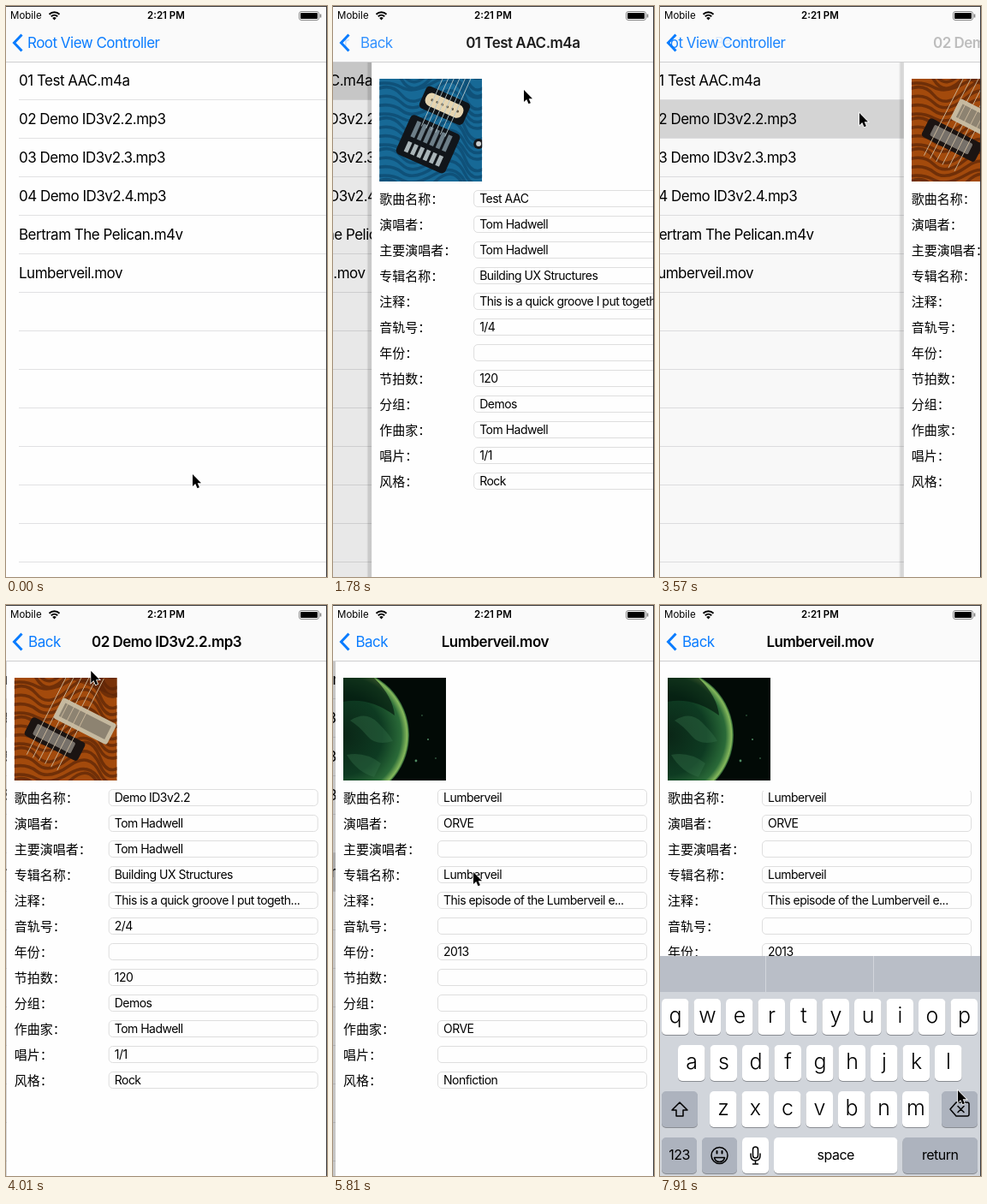
An HTML page for the animation above (8000 ms loop, 375 by 667 pixels).

```html
<!DOCTYPE html>
<html lang="zh-CN">
<head>
<meta charset="utf-8">
<title>Media metadata browser</title>
<style>
html, body { margin: 0; width: 100%; height: 100%; overflow: hidden; background: #fefefe; }
#stage { position: relative; width: 375px; height: 667px; overflow: hidden; background: #fefefe;
  font: 17px/45px Inter, "Noto Sans CJK SC", sans-serif; letter-spacing: -.03em; color: #000; white-space: nowrap; }
#stage div, #stage svg { position: absolute; }
.page { left: 0; top: 0; width: 375px; height: 667px; }
.row { left: 0; width: 375px; height: 45px; }
.row span { position: absolute; left: 15px; }
.line { left: 15px; right: 0; height: 1px; background: #e1e1e3; }
#dim { inset: 0; background: #000; }
.detail { background: #fefefe; }
.detail::before { content: ""; position: absolute; left: -6px; width: 6px; height: 667px;
  background: linear-gradient(90deg, #0000, #0002 40%, #0002); }
.label { left: 9px; font: 15px/20px "Noto Sans CJK SC", sans-serif; letter-spacing: 0; }
.field { left: 119px; width: 237px; height: 18px; padding-left: 6px; border: 1px solid #dedede;
  border-radius: 5px; font-size: 14px; line-height: 18px; }
#cover { top: 206px; width: 374px; height: 11px; background: #fefefe; }
#nav { left: 0; top: 0; width: 375px; height: 65px; background: #fafafa; border-bottom: 1px solid #cfcfd0; }
#labels { left: 13px; top: 21px; width: 362px; height: 44px; overflow: hidden; color: #0a7cff; }
#title { top: 21px; width: 374px; text-align: center; font-weight: 600; }
#network, #clock { top: 4px; font-size: 11.5px; line-height: 15px; letter-spacing: 0; }
#network { left: 5px; }
#clock { width: 374px; text-align: center; font-weight: 600; }
#keyboard { left: 0; top: 410px; }
#edge { inset: 0; border: solid #3a3a3c; border-width: 1px 1px 0 0; }
</style>
</head>
<body>
<div id="stage">
  <div class="page" id="list"></div>
  <div id="cover"></div>
  <div id="nav">
    <div id="network">Mobile</div>
    <div id="clock">2:21 PM</div>
    <div id="labels"><div id="root">Root View Controller</div><div id="back">Back</div></div>
    <div id="title"></div>
    <svg width="375" height="65" fill="none" style="left:0;top:0">
      <path id="chevron" d="M18.5 33.5L9.5 43l9 9.5" stroke="#0a7cff" stroke-width="3"/>
      <path d="M50.5 9.8a8.6 8.6 0 0 1 12 0M52.8 12.2a5.4 5.4 0 0 1 7.4 0" stroke="#000" stroke-width="2"/>
      <path d="M56.5 16.5l-2.3-2.5a3.3 3.3 0 0 1 4.6 0z" fill="#000"/>
      <rect x="342.5" y="6.5" width="23" height="10" rx="2.5" stroke="#888"/>
      <rect x="344" y="8" width="20" height="7" rx="1" fill="#000"/>
      <path d="M367.5 9.5v4" stroke="#777" stroke-width="1.5"/>
    </svg>
  </div>
  <svg id="keyboard" width="375" height="257"></svg>
  <div id="edge"></div>
  <svg id="pointer" width="14" height="20" style="left:0;top:0;overflow:visible">
    <path d="M0 0V14l3.2-3 2.3 5.2 2.4-1-2.2-5H10z" stroke="#fff" stroke-width="1.5" paint-order="stroke"/>
  </svg>
</div>
<script>
const $ = id => document.getElementById(id);
const LOOP = 8000;

// ---- list page
const files = ["01 Test AAC.m4a", "02 Demo ID3v2.2.mp3", "03 Demo ID3v2.3.mp3",
  "04 Demo ID3v2.4.mp3", "Bertram The Pelican.m4v", "Lumberveil.mov"];
let html = "";
for (let i = 0; i < 13; i++) {
  const top = 65 + i * 45;
  html += `<div class="row" style="top:${top}px"><span>${files[i] || ""}</span></div>
    <div class="line" style="top:${top + 44}px"></div>`;
}
$("list").innerHTML = html + '<div id="dim"></div>';
const rows = [...document.querySelectorAll(".row")];

// ---- cover art
function waves(color) {
  let d = "";
  for (let y = -20; y < 150; y += 9) d += `M-10 ${y}q22 ${-14 + y % 4 * 3} 36 3t38 -6t36 8t38 -4`;
  return `<path d="${d}" fill="none" stroke="${color}" stroke-width="3.5" opacity=".5"/>`;
}
function repeat(n, f) {
  return Array.from({ length: n }, (_, i) => f(i)).join("");
}
const blueGuitar = `<rect width="120" height="120" fill="#176996"/>${waves("#083a5e")}
  <g transform="translate(68 55) rotate(24)">
    <rect x="-30" y="-39" width="56" height="28" rx="5" fill="#101418"/>
    <rect x="-26" y="-33" width="47" height="16" rx="7" fill="#e6d5b0"/>
    ${repeat(6, i => `<circle cx="${-18 + i * 6.5}" cy="-25" r="1.5" fill="#665a45"/>`)}
    <rect x="-33" y="-1" width="63" height="50" rx="5" fill="#11151a"/>
    ${repeat(6, i => `<rect x="${-24 + i * 8}" y="4" width="5" height="20" fill="#6d7e88"/>
      <rect x="${-24 + i * 8}" y="30" width="5" height="13" fill="#a9b4b8"/>
      <path d="M${-17 + i * 6} -90V8" stroke="#b8c8cc" stroke-width=".8"/>`)}
  </g>
  <circle cx="116" cy="76" r="6" fill="#15181c"/><circle cx="116" cy="76" r="3" fill="#c9ced0"/>`;
const amberGuitar = `<rect width="120" height="120" fill="#a34a0c"/>${waves("#3c1504")}
  <path d="M50 -5L125 25V-5z" fill="#5c2407" opacity=".6"/>
  <g transform="translate(46 72) rotate(27)">
    <rect x="-34" y="-13" width="70" height="24" rx="4" fill="#1b1412"/>
    <rect x="-25" y="-8" width="50" height="14" rx="2" fill="#77716a"/>
    <rect x="-12" y="-49" width="70" height="27" rx="3" fill="#c5b99f"/>
    <rect x="-7" y="-44" width="60" height="17" fill="#8d8371"/>
    ${repeat(6, i => `<path d="M${-20 + i * 8} -90V30" stroke="#d0bda0" stroke-width=".8"/>`)}
  </g>`;
const planet = `<defs><radialGradient id="globe" gradientUnits="userSpaceOnUse" cx="-1" cy="67" r="78">
    <stop offset="0" stop-color="#0a2516"/><stop offset=".6" stop-color="#0e3b22"/>
    <stop offset=".88" stop-color="#2a6a38"/><stop offset=".97" stop-color="#86b95c"/>
    <stop offset="1" stop-color="#1c4f2b"/></radialGradient></defs>
  <rect width="120" height="120" fill="#020a06"/><circle cx="-1" cy="67" r="78" fill="url(#globe)"/>
  <path d="M0 0H36Q58 22 60 44Q30 22 0 28z" fill="#03150c" opacity=".65"/>
  <path d="M8 50q18 -12 32 2t18 22q-20 6 -30 -6t-20 -18M4 90q22 -4 40 10l-8 16q-20 -6 -32 -26" fill="#357049" opacity=".4"/>
  <g fill="#4f8a63"><circle cx="85" cy="97" r="1.4"/><circle cx="99" cy="72" r="1"/>
  <circle cx="108" cy="94" r=".8"/><circle cx="92" cy="44" r=".7"/></g>`;

// ---- detail pages
const names = "歌曲名称 演唱者 主要演唱者 专辑名称 注释 音轨号 年份 节拍数 分组 作曲家 唱片 风格".split(" ");
const player = "Tom Hadwell", album = "Building UX Structures";
const groove = "This is a quick groove I put togeth...";
function song(title, track) {
  return [title, player, player, album, groove, track, "", "120", "Demos", player, "1/1", "Rock"];
}
const details = {
  0: [blueGuitar, song("Test AAC", "1/4")],
  1: [amberGuitar, song("Demo ID3v2.2", "2/4")],
  5: [planet, ["Lumberveil", "ORVE", "", "Lumberveil", "This episode of the Lumberveil e...",
    "", "2013", "", "", "ORVE", "", "Nonfiction"]]
};
const pages = {};
for (const id in details) {
  const [art, values] = details[id];
  const page = pages[id] = document.createElement("div");
  page.className = "page detail";
  page.innerHTML = `<svg width="120" height="120" style="left:9px;top:85px;overflow:hidden">${art}</svg>` +
    names.map((name, i) => `<div class="label" style="top:${215 + i * 30}px">${name}：</div>
      <div class="field" style="top:${215 + i * 30}px">${values[i]}</div>`).join("");
  $("stage").insertBefore(page, $("cover"));
}

// ---- keyboard, drawn relative to its own top edge
function key(x, y, w, text = "", size = 25, fill = "#fff") {
  return `<rect x="${x}" y="${y + 1}" width="${w}" height="42" rx="5" fill="#898c92"/>
    <rect x="${x}" y="${y}" width="${w}" height="42" rx="5" fill="${fill}"/>
    <text x="${x + w / 2}" y="${y + (size > 20 ? 28 : 26)}" font-size="${size}"
      font-weight="${size > 20 ? 300 : 400}" text-anchor="middle">${text}</text>`;
}
function keyRow(letters, x, y) {
  return [...letters].map((c, i) => key(x + i * 37.5, y, 31.5, c)).join("");
}
const gray = "#adb3be";
$("keyboard").innerHTML = `<rect width="375" height="257" fill="#d1d5db"/>
  <rect width="375" height="42" fill="#b9bec7"/><path d="M123.5 0v42M249.5 0v42" stroke="#d3d6dc"/>` +
  keyRow("qwertyuiop", 2, 50) + keyRow("asdfghjkl", 21, 104) + keyRow("zxcvbnm", 58, 158) +
  key(2, 158, 42, "", 16, gray) + key(329, 158, 42, "", 16, gray) +
  key(2, 212, 41, "123", 16, gray) + key(49, 212, 41, "", 16, gray) + key(96, 212, 31) +
  key(133, 212, 144.5, "space", 16) + key(283.5, 212, 87.5, "return", 16, gray) +
  `<g fill="none" stroke="#000" stroke-width="1.5" stroke-linejoin="round" stroke-linecap="round">
    <path d="M23 171l-9 9h5v7h8v-7h5z"/>
    <path d="M339 179l7-8h13q2 0 2 2v12q0 2 -2 2h-13zM348 175.5l7 7m0-7l-7 7"/>
    <circle cx="69.5" cy="233" r="9.5"/><path d="M63.5 235.5h12q-1 5 -6 5t-6 -5z"/>
    <path d="M66.5 228v2.5M72.5 228v2.5" stroke-width="2"/>
    <rect x="108.5" y="223" width="6" height="13" rx="3"/>
    <path d="M106 231v2q0 6 5.5 6t5.5-6v-2M111.5 239v4m-3 0h6"/></g>`;

// ---- timeline
const moves = [[1576, 1, 0], [2590, 0, 0], [3524, 1, 1], [4390, 0, 1], [5408, 1, 5]]; // time, push, row
const path = [[400, 218, 547], [1400, 223, 98], [1800, 223, 98], [2450, 49, 40], [2750, 49, 40],
  [3350, 233, 125], [3650, 233, 125], [4250, 38, 55], [4700, 38, 55], [5180, 164, 312],
  [5850, 164, 312], [6380, 205, 222], [6560, 205, 222], [6700, 209, 226], [7080, 209, 226], [7850, 348, 567]];

// Critically damped spring: the part of the way still to go.
function rest(ms) {
  if (ms <= 0) return 1;
  const x = ms * .017;
  return x > 9 ? 0 : (1 + x) * Math.exp(-x);
}
function pointerAt(t) {
  const i = path.findIndex(p => p[0] > t);
  if (i < 0) return path[path.length - 1].slice(1);
  if (i === 0) return path[0].slice(1);
  const [a, b] = [path[i - 1], path[i]];
  const u = (t - a[0]) / (b[0] - a[0]), e = u * u * (3 - 2 * u);
  return [a[1] + (b[1] - a[1]) * e, a[2] + (b[2] - a[2]) * e];
}
const shift = (el, x, y = 0) => el.style.transform = `translate(${x}px,${y}px)`;

function draw(t) {
  const [start, push, row] = moves.filter(m => m[0] <= t).pop() || [0, 0, -1];
  const left = row < 0 ? 0 : rest(t - start);
  const p = push ? 1 - left : left; // 0 list, 1 detail
  const next = moves.find(m => m[0] > t);
  const pressed = next && !next[1] && next[0] - t < 140;

  shift($("list"), -112 * p);
  $("dim").style.opacity = .1 * p;
  rows.forEach((el, i) => {
    const on = i === row ? (push ? 1 : left) : 0;
    el.style.background = `rgba(217,217,217,${on})`;
  });
  for (const id in pages) {
    pages[id].style.display = +id === row && p > 0 ? "" : "none";
    shift(pages[id], 375 * (1 - p));
  }

  shift($("root"), 12 - (push ? 188 * p ** 1.22 : 200 * p));
  $("root").style.opacity = 1 - p ** 2;
  shift($("back"), 13 + 50 * (1 - p));
  $("back").style.opacity = pressed ? .25 : p ** 1.5;
  $("chevron").style.opacity = pressed ? .35 : 1;
  $("title").textContent = files[row] || "";
  shift($("title"), (push ? 289 : 265) * (1 - p));
  $("title").style.opacity = p;

  $("cover").style.display = t > 6300 ? "" : "none";
  shift($("keyboard"), 0, 257 * rest(t - 6960));
  shift($("pointer"), ...pointerAt(t));
}

// The screen refreshes in coarse steps after a first pause.
const begin = performance.now();
function tick() {
  const t = (performance.now() - begin) % LOOP;
  draw(t < 450 ? 0 : 450 + Math.floor((t - 430) / 149) * 149);
  requestAnimationFrame(tick);
}
tick();
</script>
</body>
</html>
```
